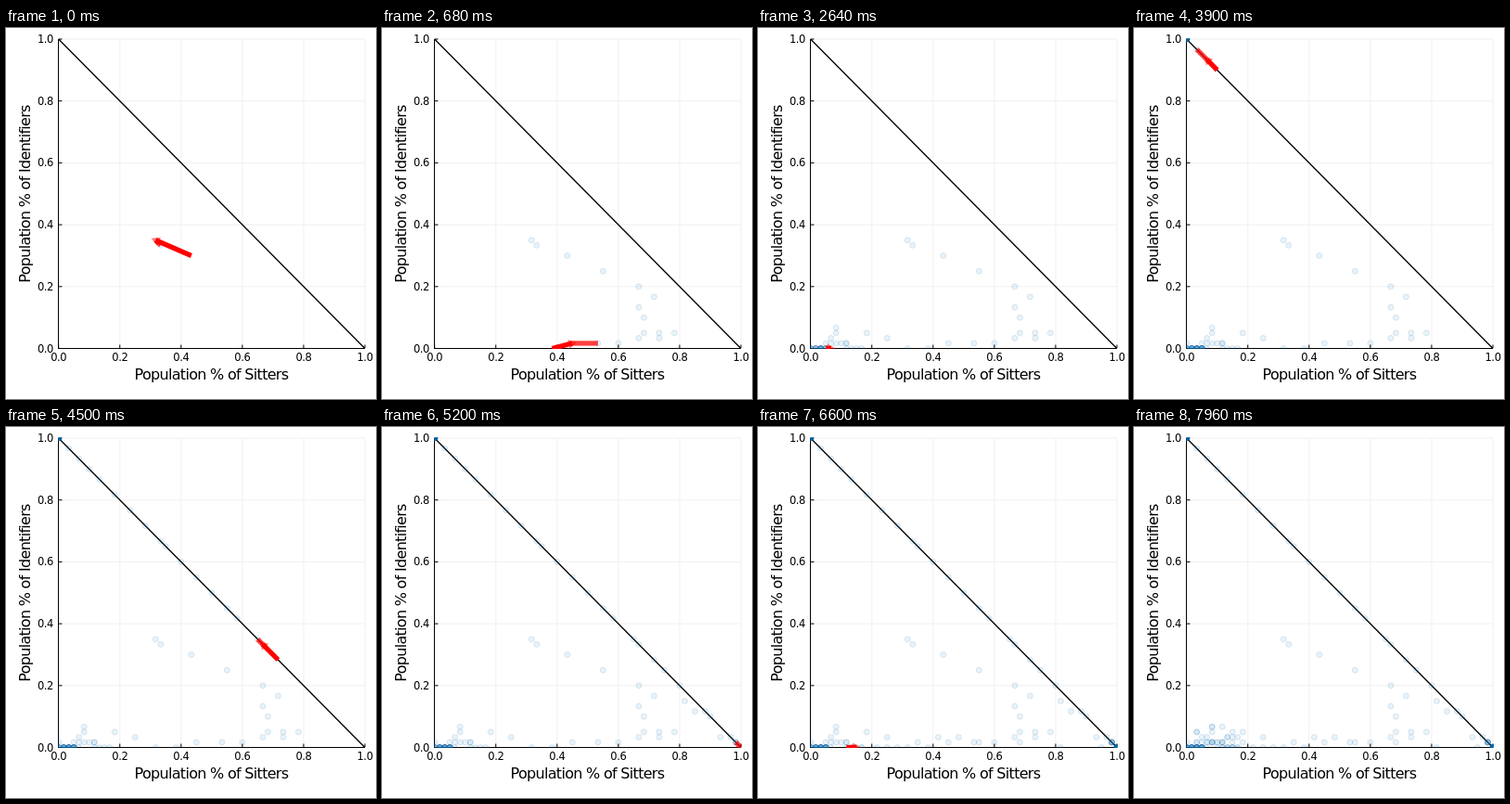
An HTML page with a canvas for the animation above (8 s loop, 399 px wide and 400 px high).

```html
<!DOCTYPE html>
<html lang="en">
<head>
<meta charset="utf-8">
<style>
  html, body { margin: 0; width: 100%; height: 100%; overflow: hidden; background: #fff; }
  canvas { display: block; }
</style>
</head>
<body>
<canvas id="stage" width="399" height="400"></canvas>
<script>
const ctx = document.getElementById('stage').getContext('2d');
const LOOP = 8000;
const PEOPLE = 60;
const LEFT = 56.7, RIGHT = 387, TOP = 12, BOTTOM = 345.5;
const px = x => LEFT + x * (RIGHT - LEFT);
const py = y => BOTTOM - y * (BOTTOM - TOP);

let seed = 7;
function random() {
  seed = (seed * 16807) % 2147483647;
  return seed / 2147483647;
}
const wobble = size => (random() * 2 - 1) * size;
const steps = (length, rule) => Array.from({ length }, (_, i) => rule(i));

// Each key is [sitters, identifiers, steps until the next key].
function trace(...keys) {
  return keys.flatMap(([x, y, count], k) => {
    const [nextX, nextY] = keys[k + 1] || [x, y];
    return steps(count, i => [x + (nextX - x) * i / count, y + (nextY - y) * i / count]);
  });
}
const nearEmpty = count => steps(count, () => [3.4 * random() ** 1.5, 0]);

function climb(i) {
  const t = i / 30;
  const x = Math.round(PEOPLE * Math.sin(Math.PI / 2 * t ** 1.2) + wobble(4 * t * (1 - t)));
  const undecided = t > 0.6 && random() < 0.4 ? 2 : 0;
  return [x, PEOPLE - x - undecided];
}

function wander(i) {
  const angle = 2 * Math.PI * i / 24;
  return [6 + 4 * Math.sin(2 * angle) + wobble(1), 1.5 - 1.5 * Math.cos(angle) + wobble(0.8)];
}

const walk = [
  ...trace([20, 20, 1], [19, 21, 1], [26, 18, 2], [40, 12, 1], [43, 10, 1], [40, 8, 2],
    [41, 3, 2], [47, 3, 1], [44, 2, 6], [19, 0, 2], [11, 3, 1], [5, 4, 1], [5, 3, 2],
    [3, 1, 8], [10, 0, 1], [7, 1, 1], [3, 0, 1]),
  ...nearEmpty(22),
  ...trace([3, 0, 1], [4, 0, 1], [3, 0, 1]),
  ...nearEmpty(11),
  ...trace([0, 1, 1]),
  ...trace([0, PEOPLE, 11]),
  ...steps(30, climb),
  ...steps(19, i => i % 5 ? [PEOPLE, 0] : [PEOPLE - 1, 1]),
  ...trace([57, 0, 3], [33, 1, 2], [25, 2, 2], [17, 0, 4], [8, 0, 1], [9, 0, 1], [7, 0, 1]),
  ...steps(24, wander),
  ...trace([0, 0, 4])
].map(([x, y]) => [
  px(Math.max(0, Math.round(x)) / PEOPLE),
  py(Math.max(0, Math.round(y)) / PEOPLE)
]);

function line(x1, y1, x2, y2, color, width = 1) {
  ctx.strokeStyle = color;
  ctx.lineWidth = width;
  ctx.beginPath();
  ctx.moveTo(x1, y1);
  ctx.lineTo(x2, y2);
  ctx.stroke();
}

function text(label, x, y, size, spacing, align = 'center') {
  ctx.font = `${size}px "DejaVu Sans", sans-serif`;
  ctx.letterSpacing = `${spacing}px`;
  ctx.textAlign = align;
  ctx.fillStyle = '#000';
  ctx.fillText(label, x, y);
}

function drawAxes() {
  const ticks = steps(6, i => i / 5);
  for (const v of ticks) {
    line(px(v), TOP, px(v), BOTTOM, '#f0f0f0');
    line(LEFT, py(v), RIGHT, py(v), '#f0f0f0');
  }
  line(56.5, TOP, 56.5, 346, '#000');
  line(56, 345.5, RIGHT, 345.5, '#000');
  for (const v of ticks) {
    line(px(v), 345, px(v), 341.5, '#000');
    line(57, py(v), 60.5, py(v), '#000');
    text(v.toFixed(1), px(v), 359, 11.5, -0.4);
    text(v.toFixed(1), 51, py(v) + 4, 11.5, -0.4, 'right');
  }
  text('Population % of Sitters', 221.5, 379, 16, -0.7);
  ctx.save();
  ctx.translate(26, 179);
  ctx.rotate(-Math.PI / 2);
  text('Population % of Identifiers', 0, 0, 16, -0.7);
  ctx.restore();
}

function drawMarker([x, y]) {
  ctx.beginPath();
  ctx.arc(x, y, 3, 0, 2 * Math.PI);
  ctx.fillStyle = 'rgba(0, 125, 205, 0.09)';
  ctx.fill();
  ctx.strokeStyle = 'rgba(0, 85, 140, 0.12)';
  ctx.lineWidth = 1;
  ctx.stroke();
}

const same = (a, b) => a[0] === b[0] && a[1] === b[1];

function drawSegment(from, to, alpha) {
  if (!same(from, to)) line(...from, ...to, `rgba(255, 0, 0, ${alpha})`, 5.3);
}

// A pale arrowhead at the bend, pointing away from the newest position.
function drawArrowhead(bend, head) {
  if (same(bend, head)) return;
  ctx.save();
  ctx.translate(...bend);
  ctx.rotate(Math.atan2(bend[1] - head[1], bend[0] - head[0]));
  ctx.fillStyle = 'rgba(255, 0, 0, 0.5)';
  ctx.beginPath();
  ctx.moveTo(5, 0);
  ctx.lineTo(-4, -5);
  ctx.lineTo(-4, 5);
  ctx.fill();
  ctx.restore();
}

// Steps last 20, 100 and 20 ms in turn.
function stepAt(time) {
  const rest = time % 140;
  return 3 * Math.floor(time / 140) + (rest < 20 ? 0 : rest < 120 ? 1 : 2);
}

function draw(time) {
  const step = Math.min(stepAt(time), walk.length - 3);
  const [tail, bend, head] = walk.slice(step, step + 3);
  ctx.clearRect(0, 0, 399, 400);
  drawAxes();
  ctx.save();
  ctx.beginPath();
  ctx.rect(56, 11, 332, 335);
  ctx.clip();
  line(px(0), py(1), px(1), py(0), '#000', 1.33);
  walk.slice(0, step + 1).forEach(drawMarker);
  drawSegment(tail, bend, 0.75);
  drawArrowhead(bend, head);
  drawSegment(bend, head, 1);
  ctx.restore();
}

const start = performance.now();
function tick() {
  draw((performance.now() - start) % LOOP);
  requestAnimationFrame(tick);
}
tick();
</script>
</body>
</html>
```
